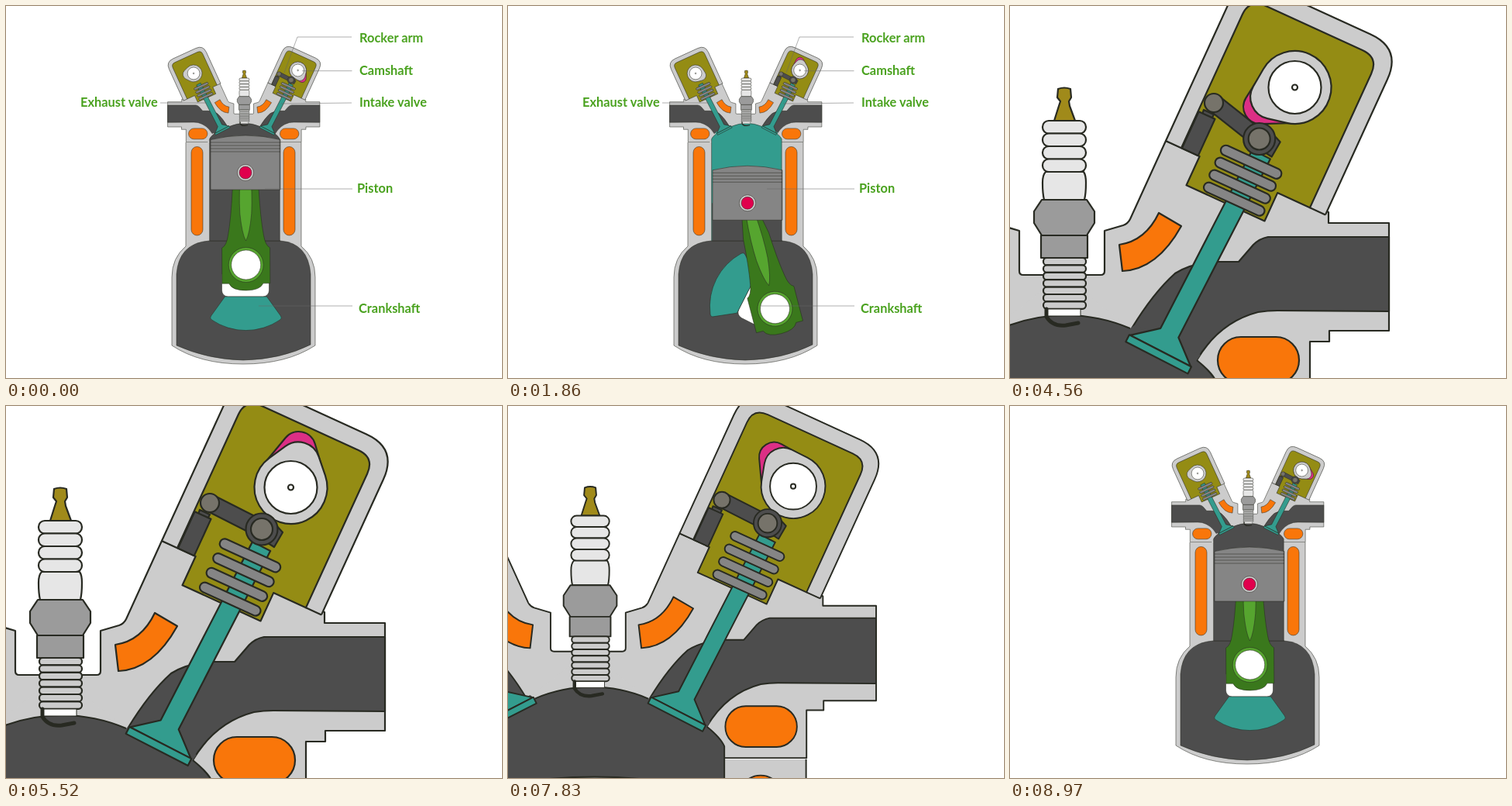
Recreate the animation shown at these times as an HTML page. Size 640x480 px, loop 9 s.

```html
<!DOCTYPE html>
<html lang="en">
<head>
<meta charset="utf-8">
<title>Four-stroke engine</title>
<style>
  html, body { margin: 0; width: 100%; height: 100%; overflow: hidden; background: #fff; }
  svg { display: block; width: 640px; height: 480px; }
  text { font: 700 16.4px Lato, "Open Sans", sans-serif; fill: #4aa21f; stroke: none; }
  .line { fill: none; }
  .gray { fill: #ccc; }
  .dark { fill: #4d4d4d; }
  .olive { fill: #948c14; }
  .orange { fill: #f9760a; }
  .teal { fill: #339c8e; }
  .pink { fill: #dc2f85; }
  .metal { fill: #858585; }
  .steel { fill: #9b9b9b; }
  .knob { fill: #76736a; }
  .white { fill: #fff; }
  .bare { stroke: none; }
</style>
</head>
<body>
<svg viewBox="0 0 640 480"><g id="world" stroke="#282a22" stroke-width=".52" stroke-linejoin="round"></g></svg>
<script>
const LOOP = 9000, STEP = 30, RUN_END = 1860, ZOOM = 4.3;
const rad = Math.PI / 180;
const $ = id => document.getElementById(id);
const mix = (a, b, k) => a + (b - a) * k;
const ramp = (t, a, b) => Math.min(1, Math.max(0, (t - a) / (b - a)));
const each = (n, f) => Array.from({ length: n }, (_, i) => f(i)).join('');

// Outline around a base circle R and a tip circle r at distance d.
function egg(R, r, d) {
  const c = (R - r) / d, s = Math.sqrt(1 - c * c);
  return `M${R * c} ${-R * s}L${d + r * c} ${-r * s}A${r} ${r} 0 0 1 ${d + r * c} ${r * s}` +
    `L${R * c} ${R * s}A${R} ${R} 0 1 1 ${R * c} ${-R * s}Z`;
}

const cam = (id, x, y, lobe) => `<g transform="translate(${x} ${y})">
  <g id="${id}">${lobe ? `<path class="pink" d="${egg(46, 22, 51)}"/>` : ''}
  <path class="gray" transform="rotate(6)" d="${egg(47, 28, 32)}"/></g>
  <circle class="white" r="34"/><circle class="white" r="3.5"/></g>`;

// Head parts use a finer unit: ZOOM units per pixel.
const half = id => `
  <rect class="gray bare" x="60" y="347" width="207" height="156"/>
  <path class="gray" d="M67 347H117Q122 347 122 342V290L146 283Q152 281 155 275L201 174L411 266V280H489V419H412V433H387V503H266"/>
  <path id="${id}" class="dark" d="M241 457Q270 408 320 395Q332 393 345 393L489 394V298H333Q322 300 314 308L295 330H268Q235 331 213 345Q185 370 157 416"/>
  <rect class="orange" x="268" y="427" width="105" height="60" rx="30"/>`;

const duct = '<path class="orange" d="M192 267L221 284Q190 340 145 342L141 308Q175 303 192 267Z"/>';

const cover = `<g transform="translate(201 174) rotate(24.6)">
  <path class="gray" d="M0 0V-191Q0 -235 44 -235H183Q227 -235 227 -191V1"/>
  <path class="olive" d="M22 0V-189Q22 -212 45 -212H182Q205 -212 205 -189V1H159V41H48V0Z"/>
  <path class="line" d="M0 0H22M205 1H227"/></g>`;

const valve = id => `<g transform="translate(197 439) rotate(27.2)"><g id="${id}">
  <path class="teal" d="M-13 -290H13V-31L44 -5H-44L-13 -31Z"/>
  <rect class="teal" x="-45" y="-5" width="90" height="10"/></g></g>`;

const spring = id => `<g transform="translate(201 174) rotate(24.6)">
  ${each(4, i => `<rect id="${id}${i}" class="metal" x="69" y="${25 - i * 20.6}" width="85" height="13" rx="6.5"/>`)}</g>`;

const rocker = `
  <path class="dark" d="M250 134L263 140L258 150L246 145Z"/>
  <rect class="dark" transform="translate(201 174) rotate(24.6)" x="23" y="-52" width="23" height="52"/>
  <path id="tail" class="dark" d="M15 -9L27 4L16 23L5 16Z"/>
  <path id="arm" class="dark"/>
  <circle class="knob" cx="263" cy="125" r="12"/>
  <g id="roller"><circle class="dark" r="20.5"/><circle class="knob" r="14"/></g>`;

const plug = `
  <path fill="#a08a1a" d="M62 107Q70 104 78 107L79 118L76 123L77 129L84 148H57L63 129L65 123L61 118Z"/>
  ${each(4, i => `<rect x="42" y="${148 + i * 16.5}" width="56" height="16.5" rx="8" fill="#e6e6e6"/>`)}
  <path fill="#e6e6e6" d="M46 214H95Q98 218 98 228Q98 242 96 250H44Q42 242 42 228Q42 218 46 214Z"/>
  <path class="steel" d="M41 250H99L109 265V280L99 296H41L31 280V265Z"/>
  <rect class="steel" x="40" y="296" width="60" height="29"/>
  ${each(7, i => `<rect class="gray" x="43" y="${325 + i * 9.4}" width="55" height="9.4" rx="4.5"/>`)}
  <rect class="white" x="46" y="391" width="45" height="9" stroke-width="1"/>
  <path class="line" stroke-width="5" stroke-linecap="round" d="M47 391V401Q55 414 72 412L88 409"/>`;

const head = s => `<g transform="translate(376.5 83) scale(${1 / ZOOM}) translate(-367 -105)" stroke-width="2.2">${s}</g>`;
const flip = (x, y, s) => `<g transform="translate(${x} ${y}) scale(-1 1)">${s}</g>`;

// The fill overlaps both valve seats a little so that no seam shows.
const roof = 'M266.6 486Q262 474 241 457L246 450L162 411L155 416Q115 399 72 399Q29 399 -11 416' +
  'L-18 411L-102 450L-97 457Q-118 474 -122.6 486V1051H266.6Z';

const block = `
  <path class="gray" d="M232 176V310Q214 325 214 350V438Q250 462 306 462Q362 462 399 438V350Q399 325 381 310V176"/>
  <path class="dark" d="M262 303Q223 306 220 346V438Q260 456 306 457Q355 456 393 437V346Q390 306 354 303Z"/>
  <rect class="orange" x="239" y="181.500" width="15" height="114.500" rx="7.500"/>
  <rect class="orange" x="358" y="181.500" width="15" height="114.500" rx="7.500"/>`;

const crank = `<g id="crank">
  <rect class="white" x="-31" y="-33" width="61" height="35" rx="8"/>
  <path class="teal" d="M-27 2H27L45 27Q47 30 44 32A78 78 0 0 1 -44 32Q-47 30 -45 27Z"/></g>`;

const rod = `<g id="rod">
  <path fill="#3a781c" d="M-11.500 -125L-17 -97Q-19 -60 -23 -38Q-25 -25 -31 -22V24H-22Q-18 33 0 33Q18 33 22 24H31V-22Q25 -25 23 -38Q19 -60 17 -97L11.500 -125Z"/>
  <path fill="#56a52f" d="M-6 -125Q-9 -92 -7.500 -66Q-5 -40 0 -31Q5 -40 7.500 -66Q9 -92 6 -125Z"/>
  <circle r="22.500" fill="#56a52f"/><circle class="white" r="19"/></g>`;

const piston = `<g id="piston">
  <path class="metal" d="M-45 22V-42.500Q-22 -48 0 -48Q22 -48 45 -42.500V22Z"/>
  <path class="line" d="M-45 -39H45M-45 -35H45M-45 -31H45M-45 -27H45"/>
  <circle class="gray" r="10.500"/><circle r="8" fill="#e0004d"/></g>`;

const notes = [
  ['Rocker arm', 456, 47, 'M446 40H376L359 86'],
  ['Camshaft', 456, 89, 'M382 83.7H446.500'],
  ['Intake valve', 456, 130, 'M355 126L446 125'],
  ['Exhaust valve', 96, 130, 'M199 125H259'],
  ['Piston', 453, 241, 'M334 236H447'],
  ['Crankshaft', 455, 396, 'M326 387H447']
];

$('world').innerHTML = block +
  head(flip(134, 0, half('portL')) + half('port') + flip(127, 0, duct) + duct +
    flip(140, 4, cover) + cover + `<path id="chamber" class="dark bare" d="${roof}"/>`) +
  '<rect id="below" class="dark bare" x="263.200" width="90"/>' +
  '<path class="line" d="M263 303H354"/>' +
  crank + rod + piston +
  head(`<path class="line" d="M155 416Q115 399 72 399Q29 399 -11 416M241 457Q262 474 266.6 486V1051M-97 457Q-118 474 -122.6 486V1051"/>` +
    cam('camL', -211, 122, false) + flip(146, 0, valve('valveL') + spring('coilL')) +
    cam('camR', 367.5, 105, true) + valve('valveR') + spring('coilR') + rocker + plug) +
  '<g id="notes" stroke="#666">' + notes.map(([s, x, y, d]) =>
    `<path class="line" d="${d}"/><text x="${x}" y="${y}">${s}</text>`).join('') + '</g>';

const put = (id, v) => $(id).setAttribute('transform', v);

function camAngle(t) {
  if (t <= RUN_END) return 62 + 208 * t / RUN_END;
  return 3 + 0.1365 * Math.max(0, t - 3480);
}

function drawCrank(t) {
  const running = t <= RUN_END;
  const turn = running ? 477 * t / RUN_END : 0;
  const a = turn * rad;
  const pinY = running ? 215 + 27 * (1 - Math.cos(a)) : 230;
  const x = 309.7 + 39 * Math.sin(a), y = 373 - 39 * Math.cos(a);
  const lean = Math.atan2(309 - x, y - pinY) / rad;
  put('crank', `translate(309.5 373) rotate(${turn})`);
  put('rod', `translate(${x} ${y}) rotate(${lean})`);
  put('piston', `translate(309 ${pinY})`);
  $('below').setAttribute('y', pinY);
  $('below').setAttribute('height', 303 - pinY);
  const gas = running && t >= 240;
  $('chamber').setAttribute('class', (gas ? 'teal' : 'dark') + ' bare');
  $('port').setAttribute('class', gas && t <= 930 ? 'teal' : 'dark');
}

function drawValves(t) {
  const angle = camAngle(t);
  const off = ((angle - 128) % 360 + 540) % 360 - 180;
  const lift = Math.abs(off) < 60 ? Math.cos(off * 1.5 * rad) : 0;
  put('camR', `rotate(${angle})`);
  put('camL', `rotate(${t <= RUN_END ? 165 + 210 * t / RUN_END : 165})`);
  put('valveR', `translate(0 ${14 * lift})`);
  for (let i = 0; i < 4; i++) $('coilR' + i).setAttribute('y', 25 - i * (20.6 - 3.7 * lift));

  const x = 330 - 10 * lift, y = 159 + 15 * lift;
  const dx = x - 263, dy = y - 125, len = Math.hypot(dx, dy);
  const nx = -dy / len * 11, ny = dx / len * 11;
  put('roller', `translate(${x} ${y})`);
  put('tail', `translate(${x} ${y})`);
  $('arm').setAttribute('d', `M${263 + nx} ${125 + ny}L${x + nx} ${y + ny}L${x - nx} ${y - ny}L${263 - nx} ${125 - ny}Z`);
}

function drawView(t) {
  const k = t < 5000 ? ramp(t, RUN_END, 3450) : 1 - ramp(t, 7620, 8970);
  const p = 1 - Math.pow(1 - k, 1.5);
  const s = mix(1, ZOOM, k);
  put('world', `translate(${mix(376.5, 367, p)} ${mix(83, 105, p)}) scale(${s}) translate(-376.5 -83)`);
  $('notes').setAttribute('opacity', t < 5000 ? 1 - k : 0);
}

const start = performance.now();
function frame() {
  const t = Math.floor((performance.now() - start) % LOOP / STEP) * STEP;
  drawCrank(t);
  drawValves(t);
  drawView(t);
  requestAnimationFrame(frame);
}
frame();
</script>
</body>
</html>
```
